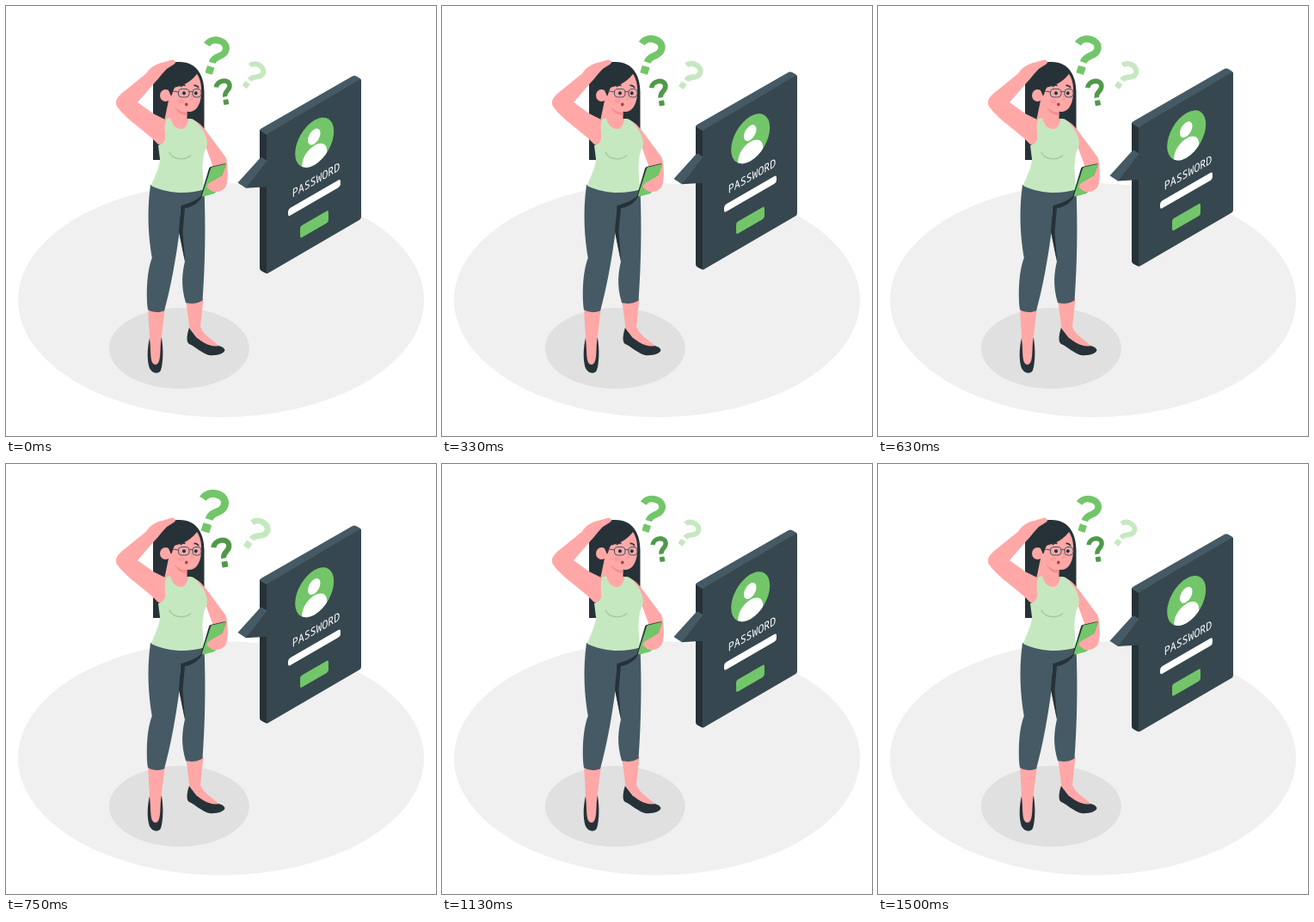
Animation of 500x500 px, one loop 1.54 s. Source, as an HTML page with a canvas:

```html
<!DOCTYPE html>
<html lang="en">
<head>
<meta charset="utf-8">
<title>Forgotten password</title>
<style>
html, body { margin: 0; width: 100%; height: 100%; overflow: hidden; background: #fff; }
canvas { display: block; width: 500px; height: 500px; }
</style>
</head>
<body>
<canvas id="stage" width="500" height="500"></canvas>
<script>
const ctx = document.getElementById('stage').getContext('2d');

const LOOP = 1540;
const FPS = 24;
const CYCLE = 1500;

const color = {
  ink: '#263238', slate: '#37474f', steel: '#455a64',
  skin: '#ffa8a7', skinShade: '#f28f8f',
  green: '#72c669', darkGreen: '#50994a', paleGreen: '#c6e8c1', fold: '#a3cd9d',
  floor: '#f0f0f0', shadow: '#e0e0e0', white: '#fff'
};

function fill(d, paint) {
  ctx.fillStyle = paint;
  ctx.fill(new Path2D(d));
}

function line(d, paint, width) {
  ctx.strokeStyle = paint;
  ctx.lineWidth = width;
  ctx.stroke(new Path2D(d));
}

function oval(x, y, rx, ry, paint) {
  ctx.beginPath();
  ctx.ellipse(x, y, rx, ry, 0, 0, Math.PI * 2);
  ctx.fillStyle = paint;
  ctx.fill();
}

function roundBox(x, y, w, h, r, paint) {
  ctx.beginPath();
  ctx.roundRect(x, y, w, h, r);
  ctx.fillStyle = paint;
  ctx.fill();
}

// Runs draw() in the plane of the panel's front face, with (x, y) as its origin.
function onFace(x, y, draw) {
  ctx.save();
  ctx.transform(0.866, -0.5, 0, 1, x, y);
  draw();
  ctx.restore();
}

function drawAvatar() {
  oval(0, 0, 26, 26, color.green);
  ctx.clip();
  oval(-0.5, -7, 8.4, 8.4, color.white);
  fill('M-16.8 27V19C-16.8 9 -9 3.5 0 3.5S16.8 9 16.8 19V27Z', color.white);
}

function drawPanel(lift) {
  ctx.save();
  ctx.translate(0, lift);
  fill('M295 144L304 149V311.3Q302 311.3 300 310L296.5 308Q295 307 295 305Z', color.ink);
  fill('M295 145Q295 143.5 297 142.5L403 81.7Q405 80.7 407 81.7L411 84Q413 85 413 87L303 150Z', color.steel);
  fill('M303 151Q303 149.5 305 148.3L411 86Q413 85 413 87V245.5Q413 248 411 249L305 310.8Q303 312 303 309.5Z', color.slate);
  fill('M269.5 205.8L295.5 177Q296.5 176 298 176.7L304 180.5L279 212Z', color.steel);
  fill('M278.5 212L303 181H304V210.5Z', color.slate);

  onFace(358.7, 159, drawAvatar);
  onFace(360.5, 207, () => {
    ctx.font = '500 13.3px "Noto Sans Mono", monospace';
    ctx.textAlign = 'center';
    ctx.fillStyle = color.white;
    ctx.fillText('PASSWORD', 0, 0);
  });
  onFace(358.5, 223.2, () => roundBox(-35.2, -4.4, 70.4, 8.8, 3, color.white));
  onFace(358.5, 254, () => roundBox(-19, -7, 38, 14, 2.5, color.green));
  ctx.restore();
}

function drawLegs() {
  fill('M167 386C164 398 164 412 166.5 420C169 427 177 429 180 423.5C183 414 183 398 181 386Z', color.ink);
  fill('M165 350H185L180.5 387C178.5 400 181 416 174 417C166.5 417 169 400 167 387Z', color.skin);
  fill('M213 374C210 383 209.5 391 213 393C220 396 228 404 236 406C245 407 254 404 254.5 400C253 396 249 396 245 394L222 386Z', color.ink);
  fill('M209 340H229.5L226 373C230 383 240 388 247.5 395C239 397.5 227 391 220.5 384L213.5 375Z', color.skin);

  fill('M168 208C163.500 240 165.800 270 169.800 293C163 310 163 340 165 353C171 357 179 356.500 184 354.5C191 330 197.500 295 202 260L203 234L231 218V212Z', color.steel);
  fill('M203 232L230.5 213C232.300 258 231.500 300 228.500 342.500C222 346.500 214 346.500 209 345C203 325 205 310 208 297L201 262Z', color.steel);
  fill('M229 219C222 226 212 230 203.5 232L201 262L208 297L205.5 262L208 235C217 234 226 228 229 219Z', color.ink);
}

function drawBody() {
  // Neck and far arm
  fill('M190 105L210.5 116V131C220 130.5 227 138 232.500 145L255.500 176C258.500 184 258.500 204 255.5 210C250 216 243 214 240 205L240 185L232 163L205 148L184 134Z', color.skin);
  fill('M196 117C201 122 206 124 210.5 123.5V127C204 127 198 123 196 117Z', color.skinShade);

  // Raised arm
  fill('M128 112C128 108 131 105 134 102L163 78.500C168 71 174 67.500 183 65.500L193 62.500C197 63 198.500 66 195 68L187 73C181 79 177 85 173 89L153 112L171 125L187 133L190 155C185 161 179 163 176 160C166 148 142 134 130 118C128 116 128 114 128 112Z', color.skin);

  // Top
  fill('M186.5 131.5L191 130C193 139 198 143 204 143C209 143 211.5 137 212 131L217 131.5C225 137 233 149 234 158C234 165 231 168 230 173C228.5 181 228 190 229 196L230 213.500C212 219 188 218.500 168.800 209C172 200 179 187 179 178L177 162C181 161 184 159 185 155C186 148 183 140 186.5 131.5Z', color.paleGreen);
  line('M190 170C194 179 208 180 215 173.5', color.fold, 1.6);

  // Phone and the hand around it
  fill('M236 189Q236.5 187.5 238 187L254 183.2Q256 183 255.5 185L244 216L229 221.5Q226.5 222 227 219.5Z', color.ink);
  fill('M238 189Q238.500 187.800 239.500 187.500L254 184Q256 183.500 255.500 185.500L244 216Q243 218 241 218.5L229.5 221.5Q227.500 221.500 228 220Z', color.green);
  fill('M257 192C252 198 243 201.500 236.500 206C232.800 208 232.800 211.500 236 212.800C240 218 249 217 254 212C257.5 208 258 198 257 192Z', color.skin);
}

function drawFace() {
  oval(185.5, 104, 6.5, 7, color.skin);
  fill('M222 79C226.500 85 228 95 226.800 105C225.500 116 220.500 123 213 123C204 123 195 119 190 111V98L193 95C203 94 215 89 222 79Z', color.skin);
  fill('M189 94H197C194 97 194 102 192 105L189 98Z', color.ink);
  oval(204, 110.5, 3.5, 2.5, '#ff9a99');

  oval(207, 101.3, 2, 2.1, color.ink);
  oval(220.8, 101.3, 1.9, 2.1, color.ink);
  line('M203 94Q205 90.8 208.5 92.5M218.5 92.5Q221.5 91.5 224 95', color.ink, 1.7);
  line('M215 103L217 108.5L214 109', color.skinShade, 0.9);
  oval(209.8, 114.4, 1.8, 2, '#9a4a50');

  ctx.strokeStyle = color.steel;
  ctx.lineWidth = 1.1;
  ctx.beginPath();
  ctx.roundRect(200.5, 96.5, 12.5, 9.5, 4);
  ctx.roundRect(217, 96.5, 10, 9.5, 4);
  ctx.stroke();
  line('M213 100Q215 98.5 217 100M194 99L200.5 100', color.steel, 1.1);
}

function drawWoman() {
  fill('M171 179V88C171 74 184 65 202 65C221 65 230.500 80 230.500 100V148L205 150L185 160L181 179Z', color.ink);
  drawLegs();
  drawBody();
  drawFace();
}

function drawMark(x, y, size, degrees, paint) {
  ctx.save();
  ctx.translate(x, y);
  ctx.rotate(degrees * Math.PI / 180);
  ctx.scale(size, size);
  line('M-13 -9C-10 -20 9 -20 9 -9C9 0 -1.5 -1 -1.5 8.5', paint, 7.6);
  roundBox(-5.7, 13.1, 8.4, 8.2, 0.8, paint);
  ctx.restore();
}

function drawMarks(scale) {
  ctx.save();
  ctx.translate(265.5, 76.5);
  ctx.scale(scale, scale);
  ctx.translate(-265.5, -76.5);
  drawMark(244.3, 58.3, 1.02, 17, color.green);
  drawMark(255, 98.7, 0.7, -10, color.darkGreen);
  drawMark(287.5, 81, 0.78, 35, color.paleGreen);
  ctx.restore();
}

// Two linear pulses per cycle: a slow fall after the first, a quick one after the second.
function pulse(p) {
  const stops = [[0, 1], [0.1, 1.2], [0.3, 1], [0.4, 1], [0.5, 1.2], [0.6, 1], [1, 1]];
  const i = Math.max(1, stops.findIndex(([at]) => at >= p));
  const [p0, s0] = stops[i - 1];
  const [p1, s1] = stops[i];
  return s0 + (s1 - s0) * (p - p0) / (p1 - p0);
}

function render(time) {
  const step = Math.min(36, Math.floor((time % LOOP + 5) * FPS / 1000));
  const phase = Math.min(1, (step * 1000 / FPS + 20) / CYCLE);
  const lift = -10 * (1 - Math.abs(2 * phase - 1));

  ctx.fillStyle = color.white;
  ctx.fillRect(0, 0, 500, 500);
  oval(250, 342, 236, 136, color.floor);
  oval(201.3, 398, 81.5, 47, color.shadow);
  drawPanel(lift);
  drawWoman();
  drawMarks(pulse(phase));
}

const start = performance.now();
function tick() {
  render(performance.now() - start);
  requestAnimationFrame(tick);
}
tick();
</script>
</body>
</html>
```
